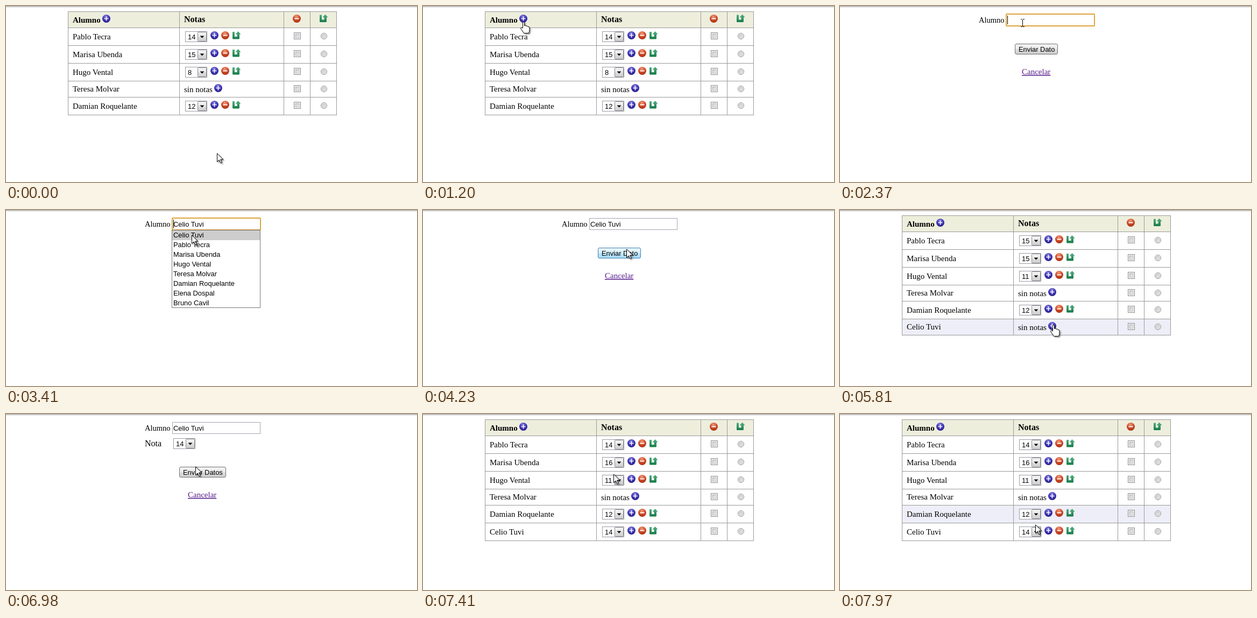
These frames come from a looping animation (764x327 px, 8 s). An HTML page:

```html
<!DOCTYPE html>
<html lang="es">
<head>
<meta charset="utf-8">
<title>Notas de alumnos</title>
<style>
  html, body { margin: 0; width: 100%; height: 100%; overflow: hidden; background: #fff; }
  svg { display: block; }
  text { font: 15px "Liberation Serif", serif; white-space: pre; }
  text.ui { font: 12.9px "Liberation Sans", sans-serif; }
  text.bold { font-weight: bold; }
  text.big { font-size: 16px; }
  text.label { font-size: 14.5px; }
  text.link { fill: #551a8b; text-decoration: underline; }
  .cursor { filter: drop-shadow(2px 2px 1.2px rgba(0, 0, 0, .4)); }
</style>
</head>
<body>
<svg width="764" height="327" viewBox="0 0 764 327">
  <defs>
    <radialGradient id="blue" cx=".45" cy=".25" r=".8">
      <stop offset="0" stop-color="#8581dc"/><stop offset=".5" stop-color="#4037b5"/><stop offset="1" stop-color="#251a86"/>
    </radialGradient>
    <radialGradient id="red" cx=".45" cy=".25" r=".8">
      <stop offset="0" stop-color="#f09a7c"/><stop offset=".5" stop-color="#d04c29"/><stop offset="1" stop-color="#a32c10"/>
    </radialGradient>
    <linearGradient id="green" x2="0" y2="1">
      <stop offset="0" stop-color="#57b184"/><stop offset="1" stop-color="#167a48"/>
    </linearGradient>
    <linearGradient id="grey" x2="0" y2="1">
      <stop offset="0" stop-color="#f3f3f3"/><stop offset=".5" stop-color="#ebebeb"/>
      <stop offset=".5" stop-color="#dddddd"/><stop offset="1" stop-color="#cfcfcf"/>
    </linearGradient>
    <linearGradient id="sky" x2="0" y2="1">
      <stop offset="0" stop-color="#eaf6fd"/><stop offset=".5" stop-color="#d9f0fc"/>
      <stop offset=".5" stop-color="#bee6fd"/><stop offset="1" stop-color="#a7d9f5"/>
    </linearGradient>
    <linearGradient id="box" x2="1" y2="1">
      <stop offset="0" stop-color="#c4c8ce"/><stop offset="1" stop-color="#f4f4f4"/>
    </linearGradient>
    <g id="plus">
      <circle r="7.5" fill="url(#blue)"/>
      <path d="M-4 0H4M0 -4V4" stroke="#fff" stroke-width="1.6"/>
    </g>
    <g id="minus">
      <circle r="7.5" fill="url(#red)"/>
      <path d="M-4 0H4" stroke="#fff" stroke-width="2"/>
    </g>
    <path id="update" fill="url(#green)"
      d="M-7 -6.5H-3V2.5H1.5V-2H-1.5L3.5 -7.5L8.5 -2H6V5.5Q6 7 4.5 7H-5.5Q-7 7 -7 5.5Z"/>
    <g id="check">
      <rect x="-6" y="-6" width="12" height="12" fill="#f4f4f4" stroke="#8e8f8f"/>
      <rect x="-3.5" y="-3.5" width="7" height="7" fill="url(#box)" stroke="#b5b9be"/>
    </g>
    <g id="radio">
      <circle r="5.5" fill="#f0f0f0" stroke="#929292"/>
      <circle r="3.3" fill="url(#box)" stroke="#c0c0c0"/>
    </g>
    <path id="arrow" class="cursor" fill="#fff" stroke="#000"
      d="M.5 .8V16.5L4.3 13L6.8 18.8L9.2 17.8L6.7 12.1H11.7Z"/>
    <path id="hand" class="cursor" fill="#fff" stroke="#000"
      d="M.5 12V2Q.5 .5 2 .5Q3.5 .5 3.5 2V7.5Q6 6.5 6.8 8.2Q9 7.5 10 9.3Q13 9 13 12V15Q13 18 11.5 21.5H2.5Q1 18.5 -3 13.5Q-4 11 -1.5 11Z"/>
    <path id="beam" fill="none" stroke="#000" d="M-3 -6.5H-1M1 -6.5H4M.5 -6V7M-3 7.5H0M1 7.5H4"/>
    <g id="busy">
      <use href="#arrow"/>
      <circle cx="18" cy="1" r="6" fill="none" stroke="#4fb4d8" stroke-width="3"/>
      <path d="M18 -5A6 6 0 0 1 24 1" fill="none" stroke="#b5e6f5" stroke-width="3"/>
    </g>
  </defs>
  <g id="stage"></g>
</svg>
<script>
const LOOP = 8000, STEP = 60;
const names = ['Pablo Tecra', 'Marisa Ubenda', 'Hugo Vental', 'Teresa Molvar', 'Damian Roquelante', 'Celio Tuvi'];
const typed = names[5];
const suggestions = [typed, ...names.slice(0, 5), 'Elena Dospal', 'Bruno Cavil'];

// start, page, grades (0 = none), time from which rows react to the pointer
const pages = [
  { at: 0, grades: [14, 15, 8, 0, 12], hoverFrom: 0 },
  { at: 1600, draw: studentForm },
  { at: 4290, grades: [15, 15, 11, 0, 12, 0], hoverFrom: 4940 },
  { at: 6270, draw: gradeForm },
  { at: 7280, grades: [14, 16, 11, 0, 12, 14], hoverFrom: 7730 },
];

// start, steps, x, y, easing power
const moves = [
  [0, 1, 392, 273], [330, 10, 187, 36], [1070, 1, 185, 29], [2000, 5, 339, 31],
  [3230, 4, 345, 46], [3810, 8, 378, 72], [4880, 10, 360, 204], [5620, 2, 395, 213],
  [6600, 4, 355, 86], [6980, 1, 352, 97], [7040, 4, 354, 111], [7670, 6, 363, 205, 1],
];

const cursors = [
  [0, 'arrow'], [1200, 'hand'], [1800, 'arrow'], [2120, 'beam'], [3290, 'arrow'], [4290, 'busy'],
  [4420, 'arrow'], [5810, 'hand'], [6600, 'arrow'], [7280, 'busy'], [7410, 'arrow'],
];

function pointer(t) {
  let x = 392, y = 273;
  for (const [start, steps, toX, toY, power = 2] of moves) {
    if (t < start) break;
    const p = Math.min(steps, Math.floor((t - start) / STEP) + 1) / steps;
    const k = 1 - (1 - p) ** power;
    x += (toX - x) * k;
    y += (toY - y) * k;
  }
  return [Math.round(x), Math.round(y)];
}

const text = (x, y, s, cls = '') => `<text x="${x}" y="${y}" class="${cls}">${s}</text>`;
const icon = (id, x, y) => `<use href="#${id}" x="${x}" y="${y}"/>`;
const fill = (x, y, w, h, color) => `<rect x="${x}" y="${y}" width="${w}" height="${h}" fill="${color}"/>`;
const frame = (x, y, w, h, color, bg = '#fff', r = 0) =>
  `<rect x="${x + .5}" y="${y + .5}" width="${w - 1}" height="${h - 1}" rx="${r}" fill="${bg}" stroke="${color}"/>`;

const select = (x, y, value) =>
  frame(x, y, 41, 20, '#9a9ca6') + text(x + 5, y + 15, value, 'ui') +
  frame(x + 23, y + 1, 17, 18, '#8b8b8b', 'url(#grey)', 1) +
  `<path d="M${x + 27.5} ${y + 8.5}h8l-4 4z"/>`;

function button(x, y, w, label, [px, py]) {
  const hot = px >= x && px < x + w && py >= y && py < y + 20;
  return frame(x, y, w, 20, hot ? '#3c7fb1' : '#707070', hot ? 'url(#sky)' : 'url(#grey)', 2.5) +
    text(x + 7, y + 15, label, 'ui');
}

function field(value, focused) {
  const border = focused
    ? '<rect x="309" y="15" width="164" height="22" rx="1" fill="#fff" stroke="#dda53c" stroke-width="2"/>'
    : frame(309, 15, 164, 22, '#a5a5b5');
  return text(258, 31, 'Alumno', 'label') + border + text(311, 31, value, 'ui');
}

function dropdown(selected) {
  return frame(308, 37, 165, 145, '#777') + (selected ? fill(309, 38, 163, 18, '#cdcdcd') : '') +
    suggestions.map((s, i) => text(311, 51 + i * 18, s, 'ui')).join('');
}

function studentForm(t, at) {
  const focused = t >= 2370 && t < 4230;
  const value = t >= 3350 ? typed : '';
  const caret = t >= 3610 ? 367 : 311;
  return field(value, focused) + (focused ? fill(caret, 18, 1, 16, '#000') : '') +
    button(325, 70, 80, 'Enviar Dato', at) + text(338, 127, 'Cancelar', 'link') +
    (t >= 2830 && t < 3610 ? dropdown(t >= 3290) : '');
}

function gradeForm(t, at) {
  return field(typed, false) + text(258, 60, 'Nota', 'big') + select(311, 45, 14) +
    button(322, 98, 87, 'Enviar Datos', at) + text(338, 155, 'Cancelar', 'link');
}

function table(grades, hoverY) {
  let out = fill(115, 10, 500, 30, '#eeeedd') +
    text(124, 31, 'Alumno', 'bold') + icon('plus', 186.5, 23.5) +
    text(331, 30, 'Notas', 'bold big') + icon('minus', 540.5, 23.5) + icon('update', 590, 23);
  let lines = fill(115, 10, 500, 1, '#999');
  let y = 40;
  grades.forEach((grade, i) => {
    const h = grade ? 33 : 30;
    const mid = y + (grade ? 16 : 15) - .5;
    if (hoverY >= y && hoverY < y + h) out += fill(115, y, 500, h, '#eeeef8');
    out += text(124, y + (grade ? 22 : 20), names[i]);
    out += grade
      ? select(333, y + 7, grade) + icon('plus', 387.5, y + 14.5) + icon('minus', 407.5, y + 14.5) + icon('update', 428, y + 14.5)
      : text(331, y + 21, 'sin notas') + icon('plus', 394.5, y + 13.5);
    out += icon('check', 541.5, mid) + icon('radio', 591, mid + .5);
    lines += fill(115, y, 500, 1, '#999');
    y += h;
  });
  lines += fill(115, y, 500, 1, '#999');
  for (const x of [115, 322, 516, 565, 614]) lines += fill(x, 10, 1, y - 9, '#999');
  return out + lines;
}

const stage = document.getElementById('stage');
let shown = '';

function render(t) {
  const at = pointer(t);
  const page = pages.findLast(p => p.at <= t);
  const hoverY = t >= page.hoverFrom ? pointer(t - STEP)[1] : -1;
  const cursor = cursors.findLast(c => c[0] <= t)[1];
  const markup = fill(0, 0, 764, 1, '#dcdcdc') + fill(0, 1, 764, 1, '#a0a0a0') +
    (page.draw ? page.draw(t, at) : table(page.grades, hoverY)) + icon(cursor, ...at);
  if (markup !== shown) stage.innerHTML = shown = markup;
}

const begin = performance.now();
function tick() {
  render((performance.now() - begin) % LOOP);
  requestAnimationFrame(tick);
}
tick();
</script>
</body>
</html>
```
